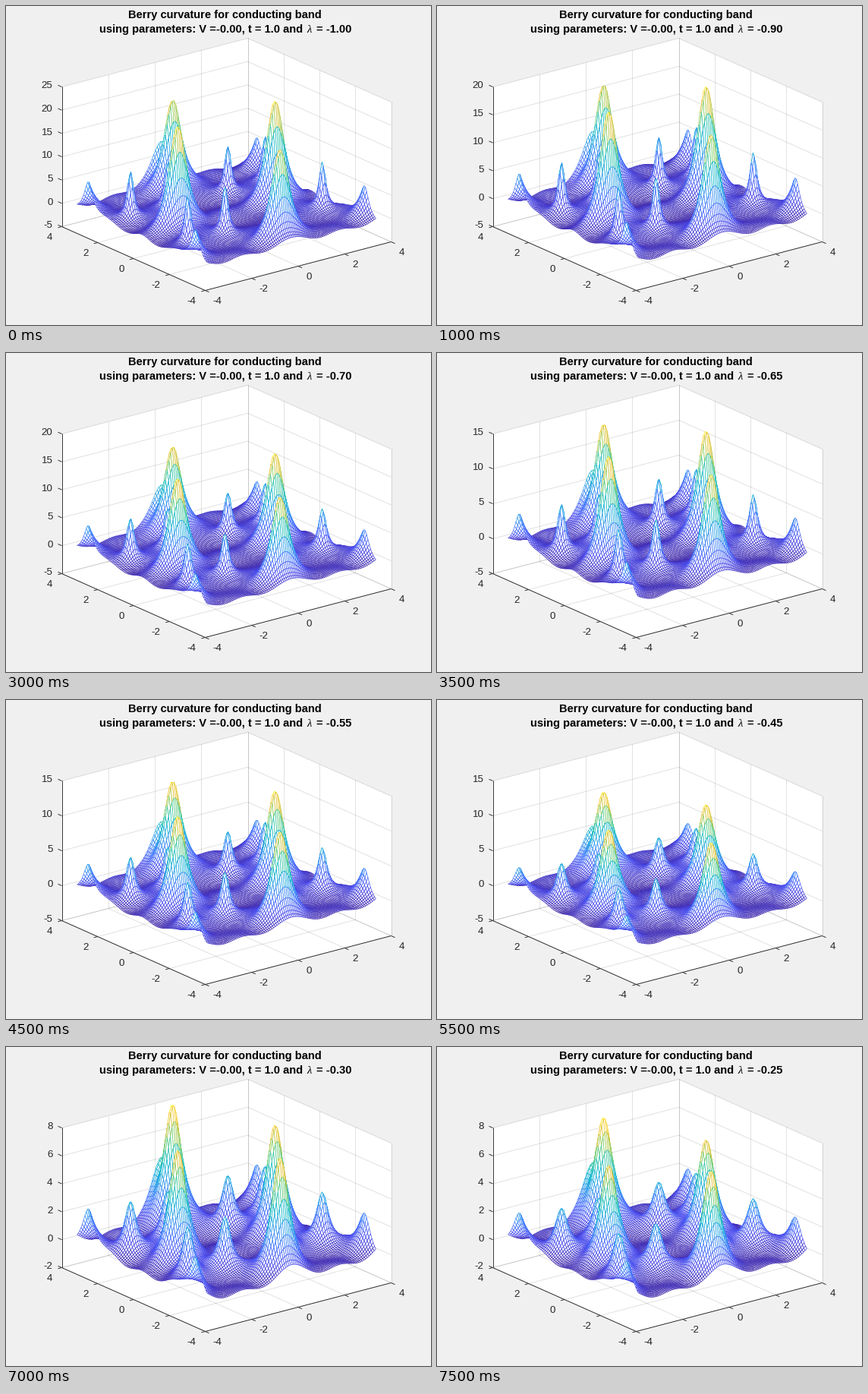
A matplotlib script that plays this animation: 560x420 px, repeating every 8000 ms.

```python
import numpy as np
import matplotlib.pyplot as plt
from matplotlib.animation import FuncAnimation
from matplotlib.collections import LineCollection, PolyCollection
from matplotlib.colors import LinearSegmentedColormap

plt.rcParams["font.family"] = "Liberation Sans"

W, H, DPI = 560, 420, 100
PT = 72 / DPI                      # points per pixel
FRAMES, INTERVAL = 16, 500
INK = (0.15, 0.15, 0.15)

# Screen position of the corner (-4, -4, bottom) and the three box edges
ORIGIN = np.array([262.0, 374.0])
EX = np.array([245.0, -64.0])
EY = np.array([-189.0, -84.0])
HEIGHT = 184.0

K = 2 * np.pi / np.sqrt(3)         # half size of the sampled zone
GX = 4 * np.pi / 3                 # period along kx
N = 100
X, Y = np.meshgrid(np.linspace(-K, K, N), np.linspace(-K, K, N))

CMAP = LinearSegmentedColormap.from_list("heat", [
    "#3e26a8", "#4747eb", "#3e6fff", "#2797eb", "#08b5d0",
    "#31c69f", "#81cc59", "#dcbd29", "#fccf30", "#f9fb15"])


def project(x, y, h=0.0):
    """Screen point for x, y in -4..4 and h in 0..1."""
    u, v = (np.asarray(x) + 4) / 8, (np.asarray(y) + 4) / 8
    return np.stack([ORIGIN[0] + u * EX[0] + v * EY[0],
                     ORIGIN[1] + u * EX[1] + v * EY[1] - h * HEIGHT], axis=-1)


def peak(x0, y0, sx, sy):
    return (1 + ((X - x0) / sx) ** 2 + ((Y - y0) / sy) ** 2) ** -1.2


def basin(x0, y0):
    """Shallow bowl around a zone centre, deepest on a ring."""
    q = ((X - x0) ** 2 + (Y - y0) ** 2) / 1.21
    return (0.6 + 2 * q) * np.exp(-q)


def summit(lam):
    return 21.2 * lam ** 0.85


def curvature(lam):
    dip = 2.0 * lam ** 0.7
    lift = 0.4 * dip
    outer = 18.3 * lam ** 0.7
    sy = 0.2 * lam ** -0.3
    s = 0.15 * lam ** -0.5

    z = 0.45 * outer * peak(0, K, 0.6, sy)
    for x0 in (-GX, 0, GX):
        z -= dip * basin(x0, 0)
        for side in (-1, 1):
            z += (outer + lift) * peak(x0, 3 * side, 0.47, sy)
    for x0 in (-GX / 2, GX / 2):
        z += (summit(lam) + lift) * peak(x0, 0, 0.47, sy)
        for side in (-1, 1):
            z -= dip * basin(x0, side * K)
            for dx in (-0.8, 0.8):
                z += (9.2 * lam ** 0.88 + lift) * peak(x0 + dx, 1.6 * side, s, s)
    return z


def z_limits(lam):
    """Bottom, top and tick step of the vertical axis."""
    step = 5 if summit(lam) > 10 else 2
    return -step, step * int(np.ceil(summit(lam) / step)), step


fig = plt.figure(figsize=(W / DPI, H / DPI), dpi=DPI, facecolor=(240 / 255,) * 3)
ax = fig.add_axes([0, 0, 1, 1])
ax.set_xlim(-0.5, W - 0.5)
ax.set_ylim(H - 0.5, -0.5)
ax.axis("off")


def label(x, y, s, size=13.33, **kw):
    kw.setdefault("color", INK)
    return ax.text(x, y, s, fontsize=size * PT, **kw)


def lines(segments, z, alpha=1.0):
    group = LineCollection(segments, colors=[INK + (alpha,)],
                           linewidths=0.9 * PT, zorder=z)
    ax.add_collection(group)
    return group


# White walls and floor
hull = [project(*p) for p in ((-4, 4, 0), (-4, 4, 1), (4, 4, 1),
                              (4, -4, 1), (4, -4, 0), (-4, -4, 0))]
ax.add_collection(PolyCollection([hull], facecolors="white",
                                 edgecolors="none", zorder=1))

OUT_X = np.array([5.0, 2.2])       # tick directions
OUT_Y = np.array([-5.0, 1.3])
OUT_Z = np.array([-5.0, -2.2])

grid, marks = [], []
for t in range(-4, 5, 2):
    grid += [[project(t, -4), project(t, 4)],
             [project(-4, t), project(4, t)],
             [project(t, 4, 0), project(t, 4, 1)],
             [project(4, t, 0), project(4, t, 1)]]
    px, py = project(t, -4), project(-4, t)
    marks += [[px, px + OUT_X], [py, py + OUT_Y]]
    label(px[0] + 10, px[1] + 13.5, str(t), ha="left", va="center_baseline")
    label(py[0] - 12.5, py[1] + 13, str(t), ha="right", va="center_baseline")
marks += [[project(-4, -4), project(4, -4)],
          [project(-4, -4), project(-4, 4)],
          [project(-4, 4, 0), project(-4, 4, 1)]]
lines(grid, 2, 0.15)
lines(marks, 3)
z_grid = lines([], 2, 0.15)
z_marks = lines([], 3)
z_labels = [label(61, 0, "", ha="right", va="center_baseline") for _ in range(7)]

title = dict(size=14.67, color="black", va="baseline")
bold = dict(title, weight="bold")
label(288, 16, "Berry curvature for conducting band", ha="center", **bold)
label(122.5, 35, "using parameters: V =-0.00, t = 1.0 and", ha="left", **bold)
label(399.5, 35, "\u03bb", ha="center", family="Liberation Serif",
      style="italic", **title)
value = label(408.5, 35, "", ha="left", **bold)

mesh = PolyCollection([], facecolors="white", linewidths=0.68 * PT, zorder=4)
ax.add_collection(mesh)


def update(i):
    lam = 1 - 0.05 * i
    low, top, step = z_limits(lam)
    z = curvature(lam)

    p = project(X, Y, (z - low) / (top - low))
    quads = np.stack([p[:-1, :-1], p[:-1, 1:], p[1:, 1:], p[1:, :-1]], axis=2)
    mesh.set_verts(quads.reshape(-1, 4, 2)[::-1])      # far cells first
    shade = (z - z.min()) / (z.max() - z.min())
    mesh.set_edgecolor(CMAP(shade[:-1, :-1].ravel()[::-1]))

    walls, ticks = [], []
    for text in z_labels:
        text.set_text("")
    for text, t in zip(z_labels, range(low, top + 1, step)):
        h = (t - low) / (top - low)
        left = project(-4, 4, h)
        walls.append([left, project(4, 4, h), project(4, -4, h)])
        ticks.append([left, left + OUT_Z])
        text.set_text(str(t))
        text.set_y(left[1] - 2.5)
    z_grid.set_segments(walls)
    z_marks.set_segments(ticks)
    value.set_text(f"= {-lam:.2f}")
    return mesh, z_grid, z_marks, value, *z_labels


anim = FuncAnimation(fig, update, frames=FRAMES, interval=INTERVAL,
                     repeat=True, repeat_delay=0, blit=False)
plt.show()
```
